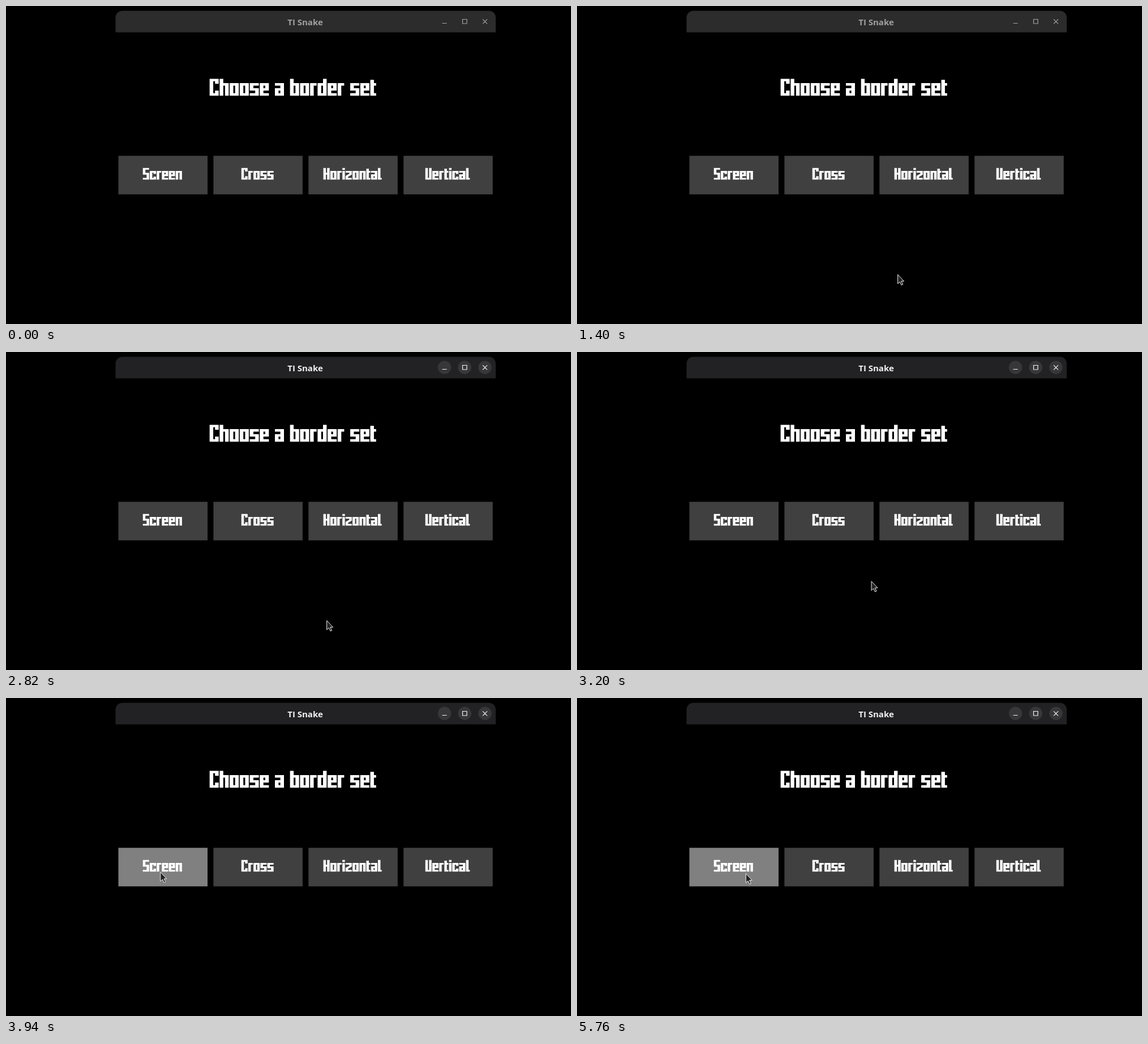
An HTML page that plays this animation: 998x561 px, repeating every 8000 ms.

```html
<!DOCTYPE html>
<html lang="en">
<head>
<meta charset="utf-8">
<title>TI Snake</title>
<style>
  html, body { margin: 0; width: 100%; height: 100%; overflow: hidden; background: #000; }
  svg { display: block; width: 100vw; height: 100vh; }
</style>
</head>
<body>
<svg id="stage" viewBox="0 0 998 561">
  <path id="bar" d="M193.5 46.5V20.5a12 12 0 0 1 12-12H853a12 12 0 0 1 12 12V46.5Z"/>
  <g id="discs" fill="#373739">
    <circle cx="774.5" cy="27.3" r="11.7"/>
    <circle cx="810.2" cy="27.3" r="11.7"/>
    <circle cx="846" cy="27.3" r="11.7"/>
  </g>
  <text id="name" x="528.5" y="33.5" text-anchor="middle" font-family="'Open Sans', 'Noto Sans', sans-serif" font-weight="700" font-size="15">TI Snake</text>
  <path id="icons" d="M770.5 30.5h8M806.5 23.5h7.5v7.5h-7.5ZM842 23.3l8 8M850 23.3l-8 8" fill="none" stroke-width="1.2"/>
  <g id="menu"></g>
  <path id="cursor" d="M.6.8V17L4.4 13.6 7 19.4 9.6 18.2 7 12.5H11.6Z" fill="#242424" stroke="#eee" stroke-width="1" stroke-linejoin="round"/>
</svg>
<script>
const LOOP = 8000;
const $ = id => document.getElementById(id);

// Block letters as pen strokes one unit wide, baseline at 0, left stem at 0.
const PEN = {
  C: 'M1.5-4.2V-5.7H0V0H1.5V-1.5',
  S: 'M2-5.7H0V-2.9H1.5V0H-.5',
  H: 'M0-6.2V.5M1.5-6.2V.5M0-2.9H1.5',
  V: 'M0-6.2V0H1.5V-6.2',
  a: 'M-.5-4H1.5V0H0V-2H1.5',
  b: 'M0-6.2V0H1.5V-4H0',
  c: 'M1.5-2.8V-4H0V0H1.5V-1.2',
  d: 'M1.5-6.2V0H0V-4H1.5',
  e: 'M2 0H0V-4H1.5V-2H0',
  h: 'M0-6.2V.5M0-4H1.5V.5',
  i: 'M0-6.2V-5.1M0-4.5V.5',
  l: 'M0-6.2V0H1',
  n: 'M0 .5V-4H1.5V.5',
  o: 'M0 0V-4H1.5V0Z',
  r: 'M0 .5V-4H1.3',
  s: 'M2-4H0V-2H1.5V0H-.5',
  t: 'M0-5.8V0H1.1M0-4H1.1',
  z: 'M-.5-4H1.5V-2.6L0-1.4V0H2'
};
const NARROW = { i: 1, l: 1.5, r: 1.8, t: 1.6, ' ': 1.13 };
const GAP = 0.27;
const advance = ch => (NARROW[ch] || 2.5) + GAP;

function make(tag, attrs, parent = $('menu')) {
  const el = document.createElementNS('http://www.w3.org/2000/svg', tag);
  for (const k in attrs) el.setAttribute(k, attrs[k]);
  return parent.appendChild(el);
}

function blockText(str, cx, baseline, size) {
  const width = [...str].reduce((sum, ch) => sum + advance(ch), -GAP);
  const line = make('g', {
    transform: `translate(${cx} ${baseline}) scale(${6.4 * size} ${4.45 * size})`,
    fill: 'none', stroke: '#fff', role: 'img', 'aria-label': str
  });
  let x = 0.5 - width / 2;
  for (const ch of str) {
    if (PEN[ch]) make('path', { d: PEN[ch], transform: `translate(${x})` }, line);
    x += advance(ch);
  }
}

blockText('Choose a border set', 506.7, 156, 1);
const buttons = ['Screen', 'Cross', 'Horizontal', 'Vertical'].map((label, i) => {
  const x = 198.5 + 167.9 * i;
  const box = make('rect', { x, y: 264.3, width: 157.5, height: 68, fill: '#404040' });
  blockText(label, x + 77.8, 304.8, 0.69);
  return box;
});

// Pointer moves; it rests at the last point of each.
const MOVES = [
  { from: 20, to: 160, via: [[585, 249], [512, 137]] },
  { from: 860, to: 1400, via: [[497, 23], [560, 497], [566, 473]] },
  { from: 2820, to: 3620, via: [[566, 473], [517, 400], [274.5, 307.5]] },
  { from: 3900, to: 4360, via: [[274.5, 307.5], [261, 301], [296.5, 308]] },
  { from: 5340, to: 5760, via: [[296.5, 308], [297.7, 309]] }
];

function pointAt(t) {
  const { from, to, via } = MOVES.findLast(m => m.from <= t);
  const legs = via.length - 1;
  const p = Math.min(1, (t - from) / (to - from)) * legs;
  const i = Math.min(legs - 1, Math.floor(p));
  return via[i].map((a, k) => a + (via[i + 1][k] - a) * (p - i));
}

const grey = (a, b, p, blue = 0) => {
  const v = a + (b - a) * p;
  return `rgb(${v},${v},${v + blue * p})`;
};

function draw(t) {
  t = Math.floor(t / 20) * 20;

  // Window gains focus
  const focus = t < 1940 ? 0 : 1 - Math.exp((1920 - t) / 25);
  $('bar').setAttribute('fill', grey(44, 34, focus, 2));
  $('name').setAttribute('fill', grey(160, 242, focus));
  $('icons').setAttribute('stroke', grey(165, 245, focus));
  $('discs').setAttribute('opacity', focus);

  buttons[0].setAttribute('fill', t < 3660 ? '#404040' : '#808080');

  // The pointer leaves the stage after its first move
  const shown = t >= 860 || (t >= 20 && t < 160);
  $('cursor').setAttribute('visibility', shown ? 'visible' : 'hidden');
  if (shown) $('cursor').setAttribute('transform', `translate(${pointAt(t)})`);
}

const start = performance.now();
function tick() {
  draw((performance.now() - start) % LOOP);
  requestAnimationFrame(tick);
}
tick();
</script>
</body>
</html>
```
